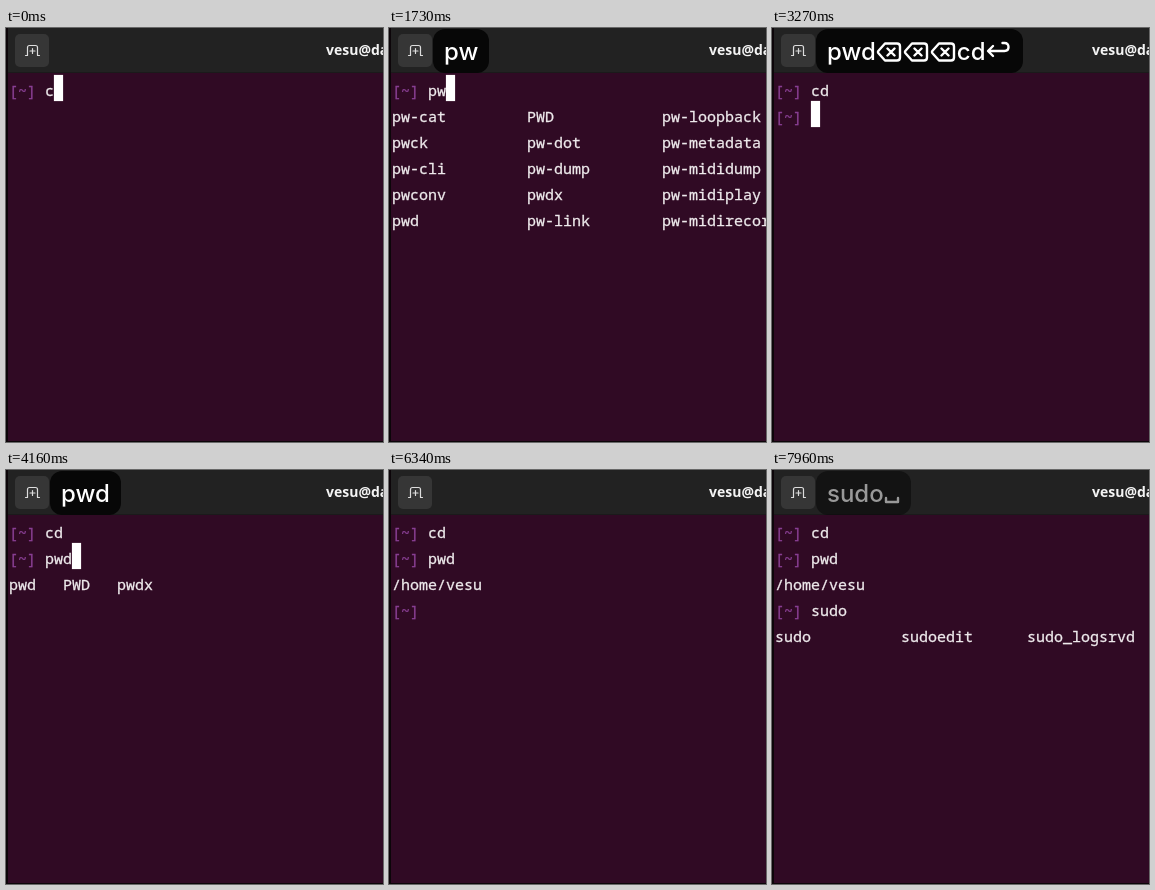
These frames come from a looping animation (377 px wide and 414 px high, 8 s). An HTML page:

```html
<!DOCTYPE html>
<html lang="en">
<head>
<meta charset="utf-8">
<title>Terminal</title>
<style>
html, body { margin: 0; width: 100%; height: 100%; overflow: hidden; background: #0c0509; }
#stage { position: absolute; inset: 0 auto auto 0; width: 377px; height: 414px; overflow: hidden; }
#stage > * { position: absolute; }
#header { left: 2px; top: 0; width: 375px; height: 45px; background: #222; box-shadow: inset 0 -1px #1b1a1b; }
#shell { left: 2px; top: 45px; width: 375px; height: 368px; background: #300a24; }
#button { left: 9px; top: 6px; width: 34px; height: 33px; border-radius: 5px; background: #363636; }
#title { left: 320px; top: 12px; font: bold 14px/20px "Noto Sans", sans-serif; color: #f4f4f4; white-space: nowrap; }
#text { left: 3px; top: 49px; margin: 0; font: 15px/26px "Noto Sans Mono", monospace; color: #eeeaec; -webkit-text-stroke: .3px; }
#text b { font-weight: 400; color: #883f93; }
#cursor { width: 9px; height: 26px; background: #fff; box-shadow: 0 0 1px #fff9; }
#keys { left: 44px; top: 1px; height: 44px; padding: 0 11px; border-radius: 12px; background: #070707;
  color: #fff; font: 500 24px/46px Inter, sans-serif; white-space: pre; }
#keys svg { vertical-align: -4px; }
svg { fill: none; stroke: #fff; stroke-width: 2.4; stroke-linecap: round; stroke-linejoin: round; }
#button svg { stroke: #ddd; stroke-width: 1.2; }
</style>
</head>
<body>
<div id="stage">
  <div id="header"></div>
  <div id="shell"></div>
  <div id="button"><svg width="34" height="33"><path d="M10.5 21.5h2v-8q0-2 2-2h6q2 0 2 2v8h2M17.5 14.5v5M15 17h5"/></svg></div>
  <div id="title">vesu@dawn</div>
  <pre id="text"></pre>
  <div id="cursor"></div>
  <div id="keys"></div>
</div>
<script>
const LOOP = 8000, HOLD = 660, FADE = 330;
const $ = id => document.getElementById(id);

// Completion list, filled column by column
const table = (width, rows, names) => Array.from({ length: rows }, (_, r) =>
  names.split(' ').filter((_, i) => i % rows === r).map(n => n.padEnd(width)).join(''));

const lists = {
  pw: table(15, 5, 'pw-cat pwck pw-cli pwconv pwd PWD pw-dot pw-dump pwdx pw-link ' +
    'pw-loopback pw-metadata pw-mididump pw-midiplay pw-midirecord'),
  pwd: table(6, 1, 'pwd PWD pwdx'),
  cd: table(19, 2, 'cd cd-create-profile cd-fix-profile cd-iccdump cd-it8'),
  su: table(14, 2, 'su sudo sudoedit sudo_logsrvd sudoreplay sudo_sendlog'),
  sudo: table(14, 1, 'sudo sudoedit sudo_logsrvd')
};
lists.sud = lists['sudo '] = lists.sudo;

const afterCd = ['[~] cd'];
const afterPwd = [...afterCd, '[~] pwd', '/home/vesu'];

// [time, typed input, lines above it]
const inputs = [
  [0, 'c', []], [600, '', []],
  [1560, 'p', []], [1730, 'pw', []], [2030, 'pwd', []],
  [2510, 'pw', []], [2630, 'p', []], [2800, '', []],
  [3040, 'c', []], [3150, 'cd', []], [3270, '', afterCd],
  [3870, 'p', afterCd], [3990, 'pw', afterCd], [4160, 'pwd', afterCd], [4570, '', afterPwd],
  [6750, 's', afterPwd], [6900, 'su', afterPwd], [6980, 'sud', afterPwd],
  [7090, 'sudo', afterPwd], [7260, 'sudo ', afterPwd]
];

// [time, pressed keys]: < backspace, > return, _ space
const presses = [
  [0, ''], [420, '<'], [480, '<'],
  [1500, 'p'], [1640, 'pw'], [1910, 'pwd'],
  [2390, 'pwd<'], [2560, 'pwd<<'], [2740, 'pwd<<<'],
  [2980, 'pwd<<<c'], [3090, 'pwd<<<cd'], [3210, 'pwd<<<cd>'],
  [3870, 'p'], [3930, 'pw'], [4100, 'pwd'], [4510, 'pwd>'],
  [6690, 's'], [6830, 'su'], [6980, 'sud'], [7090, 'sudo'], [7150, 'sudo_']
];

const cursorOff = [[360, 600], [1140, 1560], [5170, 5740], [6340, 6750], [7800, LOOP]];

const icon = (width, path) => `<svg width="${width}" height="24"><path d="${path}"/></svg>`;
const icons = {
  '<': icon(27, 'M9 3.5h12q3 0 3 3v11q0 3-3 3h-12l-6.5-7.2q-1-1.3 0-2.6zM11.5 8.5l7 7M18.5 8.5l-7 7'),
  '>': icon(27, 'M8 6l-5 5 5 5M3.5 11h16q4 0 4-4t-4-4h-2'),
  '_': icon(16, 'M2 16v4h12v-4')
};

const at = (list, t) => list.findLast(entry => entry[0] <= t);
const set = (el, html) => { if (el.shown !== html) el.innerHTML = el.shown = html; };

function draw(t) {
  const [, input, above] = at(inputs, t);
  const lines = [...above, '[~] ' + input, ...(lists[input] || [])];
  set($('text'), lines.join('\n').replaceAll('[~]', '<b>[~]</b>'));

  const cursor = $('cursor').style;
  cursor.left = 3 + 9 * (4 + input.length) + 'px';
  cursor.top = 47 + 26 * above.length + 'px';
  cursor.visibility = cursorOff.some(([a, b]) => t >= a && t < b) ? 'hidden' : 'visible';

  const [pressed, keys] = at(presses, t);
  set($('keys'), keys.replace(/[<>_]/g, k => icons[k]));
  $('keys').style.opacity = keys ? Math.max(0, Math.min(1, 1 - (t - pressed - HOLD) / FADE)) : 0;
}

const start = performance.now();
function tick() {
  draw((performance.now() - start) % LOOP);
  requestAnimationFrame(tick);
}
tick();
</script>
</body>
</html>
```
